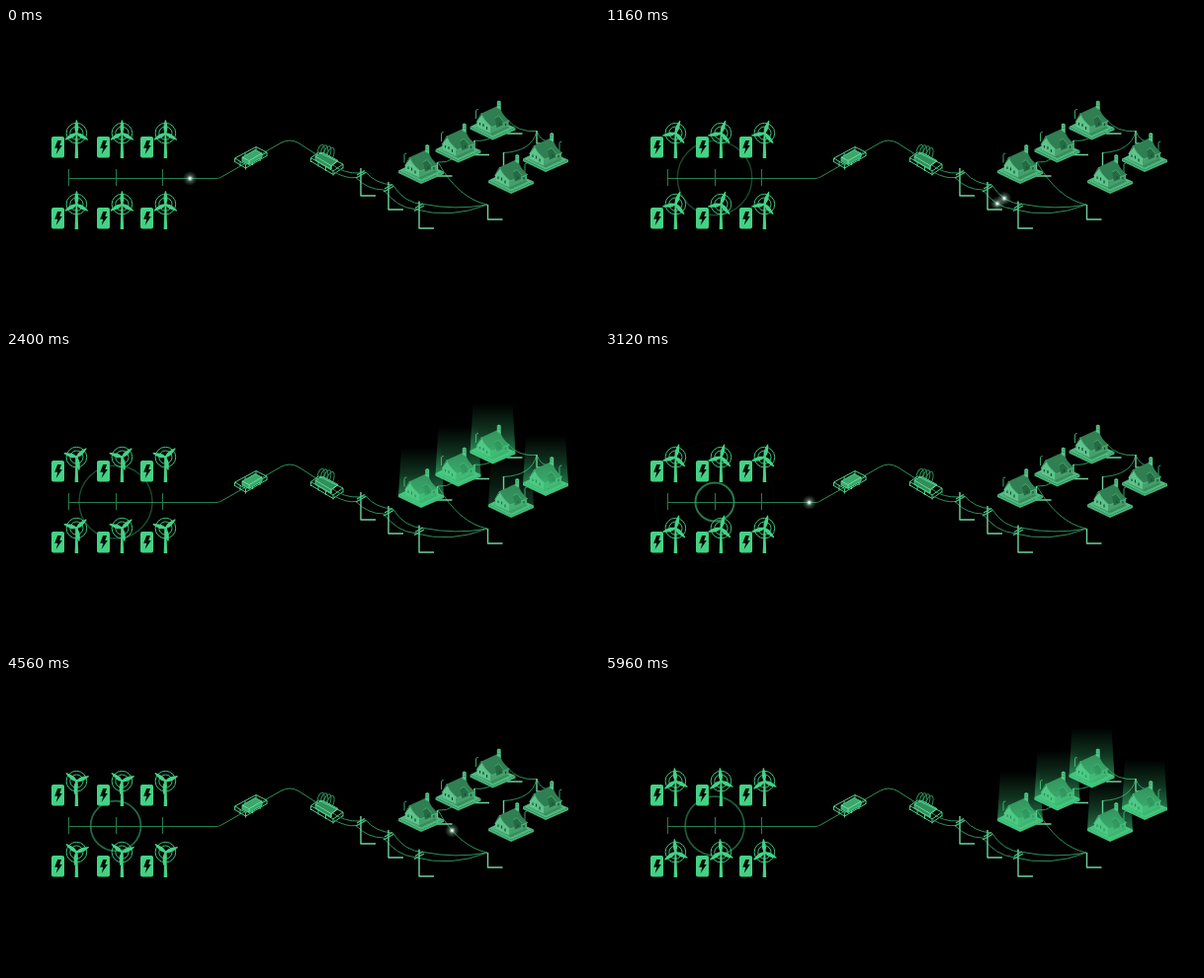
Animation of 600x300 px, one loop 6 s. Source, as an HTML page:

```html
<!DOCTYPE html>
<html lang="en">
<head>
<meta charset="utf-8">
<title>Wind power to homes</title>
<style>
html, body { margin: 0; width: 100%; height: 100%; overflow: hidden; background: #000; }
svg { display: block; width: 600px; height: 300px; }
</style>
</head>
<body>
<svg viewBox="0 0 600 300" width="600" height="300" fill="none" stroke-linejoin="round">
  <defs>
    <radialGradient id="halo">
      <stop offset="0" stop-color="#f4fff8"/>
      <stop offset=".2" stop-color="#c4e6d2" stop-opacity=".8"/>
      <stop offset=".45" stop-color="#9bcdb1" stop-opacity=".36"/>
      <stop offset="1" stop-color="#7dbd98" stop-opacity="0"/>
    </radialGradient>
    <linearGradient id="beamFill" x1="0" y1="0" x2="0" y2="1">
      <stop offset="0" stop-color="#3fcf7f" stop-opacity="0"/>
      <stop offset=".45" stop-color="#3fcf7f" stop-opacity=".25"/>
      <stop offset="1" stop-color="#3fcf7f" stop-opacity=".72"/>
    </linearGradient>
    <g id="battery">
      <rect width="13" height="21.4" rx="2" fill="#44d285"/>
      <path d="M6.200 4H10L8.300 9H10.800L4.700 18L6.300 11.800H3.200Z" fill="#020c06"/>
    </g>
    <path id="blade" d="M-.8 0C-1.500-2.500-2.200-4-2-6C-1.800-9-.8-12-.5-13.400H.5C.8-12 1.800-9 2-6C2.200-4 1.500-2.500 .8 0Z" fill="#44d285"/>
    <g id="rotor"><use href="#blade"/><use href="#blade" transform="rotate(120)"/><use href="#blade" transform="rotate(240)"/><circle r="1.500" fill="#44d285"/></g>
    <g id="mast">
      <circle r="10.300" stroke="#3dc37a" stroke-width="1"/>
      <circle r="6.600" stroke="#3dc37a" stroke-width="1"/>
      <path d="M-.9 1H.9L1.800 25.500H-1.800Z" fill="#44d285"/>
    </g>
    <g id="house">
      <path d="M-23-3L0 8.500L23-2V.5L0 10.500L-23-.5Z" fill="#43b476"/>
      <path d="M-23-3L-3-13L23-2L0 8.500Z" fill="#50b87f"/>
      <path d="M-17-2.500L0 6L17-2L8-7L-10-8Z" fill="#358f5c"/>
      <path d="M-16-8.500L-11-15.500L-2-4V4L-16-2.500Z" fill="#5dc48b"/>
      <path d="M-2-4L16-10V-4L-2 4Z" fill="#459f6d"/>
      <path d="M-11.500-16.500L7-25C8-18 12-13 17-9L-1-2.500C-6-7-10-11-11.500-16.500Z" fill="#307f52"/>
      <path d="M-11.500-16.500L-16.500-7.500M-11.500-16.500C-10-11-6-7-1-2.500L17-9" stroke="#55bd84" stroke-width=".7"/>
      <path d="M2-11.500L6-14L10-9V-4.500L4-2Z" fill="#246b43"/>
      <path d="M2-11.500L6-14L10.500-8.500" stroke="#55bd84" stroke-width=".6"/>
      <path d="M4.300-22V-28.500L6.200-29.600L8.200-28.500V-20Z" fill="#55c488"/>
      <path d="M5.200-27H7.200M5.200-24.500H7.200" stroke="#1d6b41" stroke-width=".6"/>
      <path d="M-13-7V-4.500M-9.500-6V-3M-6-3V0M7-7V-4.500M13-6.500V-4" stroke="#164f30" stroke-width="1.200"/>
    </g>
    <path id="beam" d="M-23-1L-20-51H20L23-1L0 10Z" fill="url(#beamFill)"/>
    <path id="lamp" d="M0 9V1Q.3-.8 2.300-.4" stroke="#37a568" stroke-width="1"/>
    <g id="spark"><circle r="7.500" fill="url(#halo)"/><circle r="1.100" fill="#fff"/></g>
  </defs>

  <rect width="600" height="300" fill="#000"/>
  <g stroke="#237f4d" stroke-width="1">
    <path d="M63.500 143V160M111.500 143V160M158.500 143V160"/>
    <path d="M63 152.500H213Q215.500 152.500 218 151"/>
    <path d="M218 151L278 116.500Q287 111.500 296 116.500L337 143" stroke="#2c9059"/>
  </g>
  <g id="pulses" stroke="#36ae6c"></g>
  <g id="farm"></g>

  <g id="stations" stroke="#4fd08b" stroke-width="1">
    <path d="M231.500 132L253 120.500L264 126L242.500 138.500ZM231.500 135.500L242.500 142L264 129.500M231.500 132V136M237 135V140M242.500 138.500V143.500M249.500 134.500V139M257 130V135M264 126V130M242 126.500V129M253 120.500V124"/>
    <path d="M239 131L252 123.500L259 127V131L246 138.500L239 135Z" fill="#3aa76b"/>
    <path d="M239 131L246 134.500L259 127M246 134.500V138" stroke="#6adf9f"/>
    <g stroke="#2c8d58">
      <ellipse cx="318.500" cy="125" rx="3.200" ry="7" transform="rotate(16 318.500 125)"/>
      <ellipse cx="321.800" cy="125.500" rx="3.200" ry="7" transform="rotate(16 321.800 125.500)"/>
      <ellipse cx="325.200" cy="126.500" rx="3.200" ry="7" transform="rotate(16 325.200 126.500)"/>
      <ellipse cx="328.500" cy="128" rx="3.200" ry="7" transform="rotate(16 328.500 128)"/>
    </g>
    <path d="M313 130L320 126L336 134.500L329 140V143L313 134Z" fill="#318f5a"/>
    <path d="M313 130L329 139.500L336 134.500M329 139.500V143" stroke="#5fd897"/>
    <path d="M308.500 131.500L316.500 126L341 138L331 145ZM308.500 135L331 148.500L341 141.500M308.500 131.500V136M316 135.500V140.500M323.500 140V145M331 145V149.500M341 138V142.500"/>
  </g>

  <g id="wires" stroke="#2c9059" stroke-width="1"></g>
  <g id="poles" stroke-width="1.400"></g>
  <g id="houses"></g>
  <g id="beams"></g>
  <g id="sparks"></g>
</svg>
<script>
const LOOP = 6000, TRIP = 3000, SPIN = 0.12, HUB_Y = 106.6;
const PULSE = { gap: 1260, life: 2000, speed: 0.0325, max: 5 };
const byId = id => document.getElementById(id);

function add(parent, tag, attrs) {
  const node = document.createElementNS('http://www.w3.org/2000/svg', tag);
  for (const key in attrs) node.setAttribute(key, attrs[key]);
  byId(parent).appendChild(node);
  return node;
}
const stamp = (parent, shape, x, y) =>
  add(parent, 'use', { href: '#' + shape, transform: `translate(${x} ${y})` });
const clamp = v => Math.max(0, Math.min(1, v));

// Wind farm
const rotors = [];
for (const dy of [0, 72]) {
  for (const [x, hub] of [[46, 71.4], [92, 117.4], [136, 161.4]]) {
    const y = HUB_Y + dy;
    stamp('farm', 'battery', x, 110 + dy);
    stamp('farm', 'mast', hub, y);
    rotors.push({ node: stamp('farm', 'rotor', hub, y), x: hub, y });
  }
}
const rings = Array.from({ length: PULSE.max }, () => add('pulses', 'circle', { cx: 111, cy: 152 }));

// Power line
const upper = ['M364 146Q374 158 391.500 159', 'M391.500 159Q403 178 423 178.500', 'M423 178.500Q455 185 487 179'];
const lower = ['M354 151.500Q366 164 382 164', 'M382 164Q396 182 413 183.500', 'M413 183.500Q450 194 487 179'];
const back = 'M487 179Q458 173 437 136', toFirst = 'M437 136Q446 137 453 132';
const toSecond = 'M453 132Q466 126 474 114', toThird = 'M474 114Q494 117 507.500 93';
const toCorner = 'M507.500 93Q518 106 537 104.500';
const toFourth = 'M537 104.500Q541 116 552 115', toFifth = 'M537 104.500Q532 125 503.500 126.500';
for (const d of [...upper, ...lower, back, toFirst, toSecond, toThird, toCorner, toFourth, toFifth,
  'M337 143Q350 149 364 146', 'M332 146Q345 153 354 151.500']) add('wires', 'path', { d });

for (const [x, y, height, arm] of [[359, 142, 28, 1], [387, 156, 28, 1], [418, 175.500, 27.500, 1],
  [487.500, 179, 15], [436.500, 136, 14], [474, 114, 14.500], [507.500, 93, 14], [537, 104, 13], [503.500, 126, 14]]) {
  add('poles', 'path', { d: `M${x} ${y}v${height}h15`, stroke: '#6fd29d' });
  if (arm) add('poles', 'path', { d: `M${x - 5} ${y + 10}l10-5.500M${x - 4} ${y + 7}l8-4.500`, stroke: '#4bc483' });
}

// Homes: position and the moment each one lights up
const homes = [[492.5, 103, 1820], [457.5, 126, 1740], [420, 147.5, 1640],
  [546, 135.5, 2020], [511, 157.5, 2240]].map(([x, y, start], i) => {
  stamp('houses', 'lamp', x + (i > 2 ? 14 : -17), y - 20);
  stamp('houses', 'house', x, y);
  return { start, beam: stamp('beams', 'beam', x, y) };
});

// Spark legs: path, departure, arrival
const legs = [
  ['M186 152.500H215', 0, 170],
  ['M215 152.500L278 116.500Q287 111.500 296 116.500L310 125', 170, 600],
  ['M310 125L337 143Q350 149 364 146', 600, 850],
  [upper[0], 850, 1060], [upper[1], 1060, 1270], [upper[2], 1270, 1460],
  [lower[0], 810, 1030], [lower[1], 1030, 1270], [lower[2], 1270, 1460],
  [back, 1460, 1620], [toFirst, 1620, 1720],
  [toSecond, 1720, 1900], [toThird, 1900, 2060], [toCorner, 2060, 2180],
  [toFourth, 2180, 2330], [toFifth, 2180, 2360]
].map(([d, from, to]) => {
  const path = add('sparks', 'path', { d });
  return { path, from, to, length: path.getTotalLength(), spark: stamp('sparks', 'spark', 0, 0) };
});

function draw(time) {
  const t = time % LOOP, trip = t % TRIP;

  for (const { node, x, y } of rotors)
    node.setAttribute('transform', `translate(${x} ${y}) rotate(${t * SPIN})`);

  rings.forEach((ring, i) => {
    const age = t - i * PULSE.gap, left = 1 - age / PULSE.life;
    const visible = age > 0 && left > 0;
    ring.setAttribute('r', visible ? age * PULSE.speed : 0);
    ring.setAttribute('stroke-width', visible ? 0.6 + 2 * left : 0);
    ring.setAttribute('opacity', visible ? left : 0);
  });

  for (const { beam, start } of homes)
    beam.setAttribute('opacity', clamp((trip - start) / 320));

  for (const { path, from, to, length, spark } of legs) {
    const active = trip >= from && trip < to;
    spark.setAttribute('visibility', active ? 'visible' : 'hidden');
    if (!active) continue;
    const p = path.getPointAtLength(length * (trip - from) / (to - from));
    spark.setAttribute('transform', `translate(${p.x} ${p.y})`);
  }
}

const begin = performance.now();
function tick() {
  draw(performance.now() - begin);
  requestAnimationFrame(tick);
}
draw(0);
requestAnimationFrame(tick);
</script>
</body>
</html>
```
